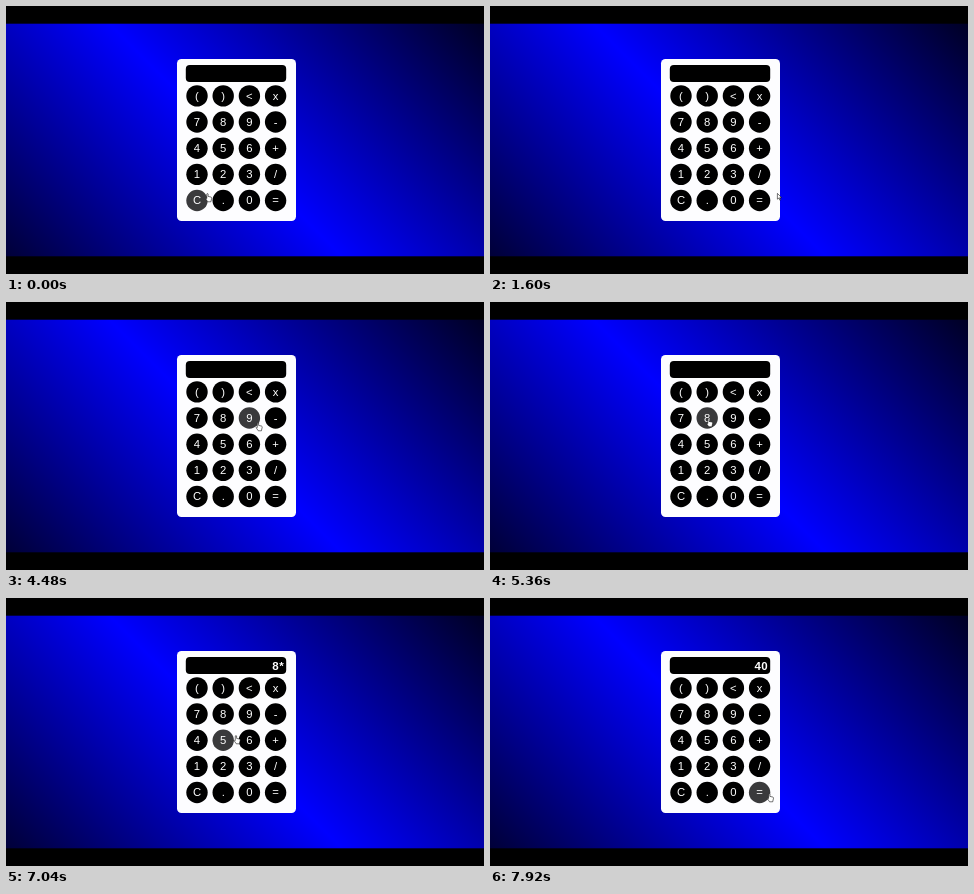
An HTML page that plays this animation: 478x268 px, repeating every 8 s.

```html
<!DOCTYPE html>
<html lang="en">
<head>
<meta charset="utf-8">
<title>Calculator</title>
<style>
html, body { margin: 0; width: 100%; height: 100%; overflow: hidden; background: #000; }
svg { position: absolute; left: 0; top: 0; }
text { font-family: "Liberation Sans", Arial, sans-serif; fill: #fff; }
.key text { font-size: 11.3px; text-anchor: middle; }
.key.hot circle { fill: #3a3a3c; }
#out { font-size: 11.5px; font-weight: bold; letter-spacing: .5px; text-anchor: end; }
#cursor path { fill: #fff; stroke: #000; stroke-width: .55; stroke-linejoin: round; }
</style>
</head>
<body>
<svg width="478" height="268" viewBox="0 0 478 268">
  <linearGradient id="blue" gradientUnits="userSpaceOnUse" x1="61.35" y1="311.65" x2="416.65" y2="-43.65">
    <stop offset="0" stop-color="#000038"/>
    <stop offset=".473" stop-color="#00f"/>
    <stop offset="1" stop-color="#000024"/>
  </linearGradient>
  <rect y="17.7" width="478" height="232.6" fill="url(#blue)"/>
  <rect x="171" y="53" width="119" height="162" rx="4.5" fill="#fdfdff"/>
  <rect x="179.8" y="59" width="100.4" height="17" rx="4"/>
  <text id="out" x="278.2" y="71.6"></text>
  <g id="keys"></g>
  <g id="cursor">
    <path id="arrow" d="M.4 .4V6.2L1.8 5L2.8 7.2L3.7 6.8L2.7 4.7H4.6Z"/>
    <path id="hand" d="M1.3 .9Q2 .1 2.6 .9V3.4L5.6 4.1Q6.3 4.4 6.2 5.2L5.4 8.8H2.3L.1 5.7Q.2 4.9 1.3 5.5Z"/>
  </g>
</svg>
<script>
const NS = "http://www.w3.org/2000/svg";
const LOOP = 8000, STEP = 80;
const $ = id => document.getElementById(id);

// time, cursor x, cursor y, key under the cursor
const moves = [
  [0, 199.5, 187, "C"], [80, 218, 188, "."], [160, 248, 189, "0"], [240, 279, 190, "="],
  [1600, 287, 187, ""], [2720, 301, 134, ""],
  [4320, 254.5, 122, ""], [4480, 250, 120, "9"],
  [4800, 233, 108, ""], [4880, 224, 98, ""],
  [5360, 216.5, 116, "8"], [5680, 217, 116.5, "8"],
  [6320, 279, 89, "x"], [6640, 271, 96, "x"], [6720, 262, 105, ""], [6800, 254.5, 113, ""],
  [6880, 246, 121, "9"], [6960, 237, 130, ""], [7040, 228, 137, "5"], [7120, 221, 140, "5"],
  [7360, 224, 143, "5"], [7440, 233, 152, ""], [7520, 247, 166, "3"], [7600, 262, 181, ""],
  [7680, 277.3, 195, "="]
];
const readout = [[0, ""], [5840, "8"], [6480, "8*"], [7200, "8*5"], [7840, "40"]];

function add(parent, tag, attrs) {
  const el = document.createElementNS(NS, tag);
  for (const k in attrs) el.setAttribute(k, attrs[k]);
  return parent.appendChild(el);
}

const keys = {};
[..."()<x789-456+123/C.0="].forEach((label, i) => {
  const x = 191 + (i % 4) * 26.2, y = 89.9 + Math.floor(i / 4) * 26.15;
  const key = add($("keys"), "g", { class: "key" });
  add(key, "circle", { cx: x, cy: y, r: 10.7 });
  add(key, "text", { x, y: y + 3.7 }).textContent = label;
  keys[label] = key;
});

const at = (list, t) => list.filter(e => e[0] <= t).pop();

function draw(now) {
  const t = Math.floor((now % LOOP) / STEP) * STEP;
  const [, x, y, hot] = at(moves, t);
  $("out").textContent = at(readout, t)[1];
  for (const label in keys) keys[label].classList.toggle("hot", label === hot);
  $("cursor").setAttribute("transform", `translate(${x} ${y})`);
  $("hand").style.display = hot ? "" : "none";
  $("arrow").style.display = hot ? "none" : "";
}

const start = performance.now();
function tick() {
  draw(performance.now() - start);
  requestAnimationFrame(tick);
}
tick();
</script>
</body>
</html>
```
